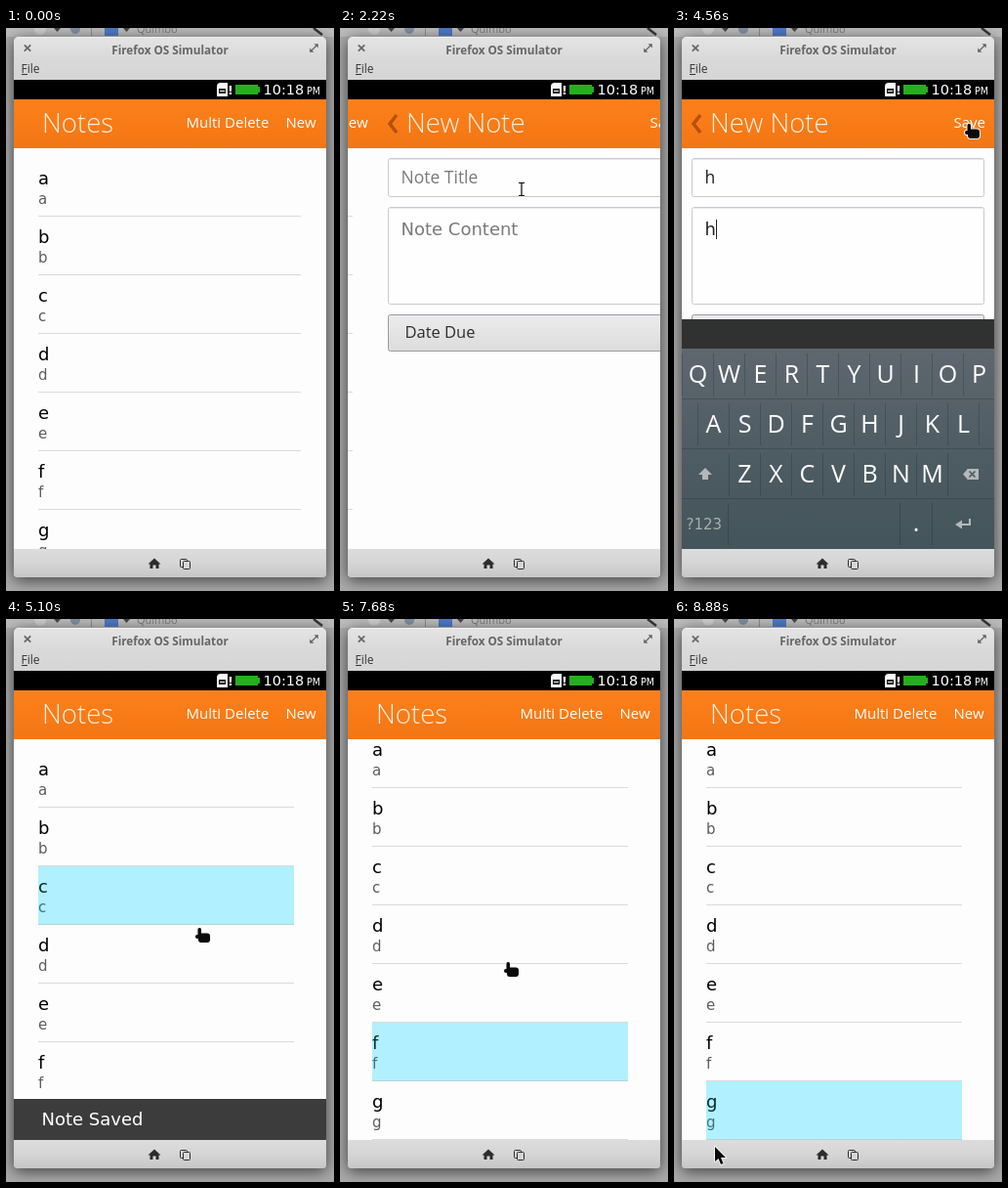
Write an HTML page with a canvas that moves like this. It is 336 by 576 pixels and loops after 8.94 s.

```html
<!DOCTYPE html>
<html lang="en">
<head>
<meta charset="utf-8">
<title>Notes</title>
<style>
html, body { margin: 0; width: 100%; height: 100%; overflow: hidden; background: #a6a6a6; }
canvas { display: block; width: 336px; height: 576px; }
</style>
</head>
<body>
<canvas id="stage" width="336" height="576"></canvas>
<script>
const c = document.getElementById('stage').getContext('2d');
const LOOP = 8940, STEP = 60, ROW = 60, KEY = 32;
const SANS = '"Open Sans", "Noto Sans", sans-serif';
const WIDE = '"DejaVu Sans", sans-serif';
const OPEN = 2004, SAVE = 4700, SLIDE = 400;

// Pointer moves: start, end, x, y reached at the end
const MOVES = [
  [60, 480, 314, 245], [780, 1560, 302, 98], [1980, 2220, 186, 165],
  [3000, 3240, 163, 224], [3900, 4560, 302, 98], [4740, 5100, 198, 316],
  [5100, 5580, 185, 374], [6600, 7020, 180, 446], [7020, 7440, 172, 351],
  [7740, 8880, 42, 540]
];

const clamp = u => Math.max(0, Math.min(1, u));
const ease = (t, start, dur) => 1 - (1 - clamp((t - start) / dur)) ** 3;

function pointer(t) {
  let x = 334, y = 490;
  for (const [start, end, tx, ty] of MOVES) {
    const u = clamp((t - start) / (end - start));
    x += (tx - x) * u;
    y += (ty - y) * u;
  }
  return { x, y };
}

function box(x, y, w, h, fill) {
  c.fillStyle = fill;
  c.fillRect(x, y, w, h);
}

function text(s, x, y, font, fill, align = 'left') {
  c.font = font;
  c.fillStyle = fill;
  c.textAlign = align;
  c.fillText(s, x, y);
}

function fade(y0, y1, ...stops) {
  const g = c.createLinearGradient(0, y0, 0, y1);
  stops.forEach((s, i) => g.addColorStop(i / (stops.length - 1), s));
  return g;
}

function line(points, stroke, width = 1) {
  c.beginPath();
  points.forEach(([x, y]) => c.lineTo(x, y));
  c.strokeStyle = stroke;
  c.lineWidth = width;
  c.stroke();
}

function cross(x, y, r, stroke) {
  line([[x - r, y - r], [x + r, y + r]], stroke, 1.7);
  line([[x + r, y - r], [x - r, y + r]], stroke, 1.7);
}

// Triangle with its base centred on x, y; turn is in quarter turns from "up"
function tri(x, y, half, height, turn, fill) {
  c.save();
  c.translate(x, y);
  c.rotate(turn * Math.PI / 2);
  c.beginPath();
  c.moveTo(-half, 0);
  c.lineTo(0, -height);
  c.lineTo(half, 0);
  c.fillStyle = fill;
  c.fill();
  c.restore();
}

function disc(x, y, r, fill) {
  c.beginPath();
  c.arc(x, y, r, 0, 7);
  c.fillStyle = fill;
  c.fill();
}

function round(x, y, w, h, r, fill, stroke) {
  c.beginPath();
  c.roundRect(x, y, w, h, r);
  if (fill) { c.fillStyle = fill; c.fill(); }
  if (stroke) { c.strokeStyle = stroke; c.lineWidth = 1; c.stroke(); }
}

function desktop() {
  box(0, 0, 336, 576, '#aaaaaa');
  box(0, 0, 336, 9, '#bcbcbc');
  disc(35, 1, 6, '#d0d0d0');
  disc(71, 1, 5, '#7f8fa0');
  for (const x of [52.5, 123.5]) tri(x, 0, 3.5, 4, 2, '#444');
  box(87, 0, 1, 8, '#8a8a8a');
  box(101, 0, 14, 8, '#4a78c8');
  text('Quimbo', 134, 5, '11px ' + SANS, '#777');
  line([[315, 0], [324, 7]], '#333', 2.5);
  c.save();
  c.shadowColor = 'rgba(40,40,40,.85)';
  c.shadowBlur = 16;
  c.shadowOffsetY = 3;
  round(8, 9, 320, 553, [5, 5, 4, 4], '#d8d8d8');
  c.restore();
}

function windowFrame() {
  const ink = '#666', dark = '#2c2c2c';
  round(8, 9, 320, 46, [5, 5, 0, 0], fade(9, 53, '#e4e4e4', '#d9d9d9', '#d5d5d5'));
  round(8, 533, 320, 29, [0, 0, 4, 4], fade(533, 562, '#dcdcdc', '#d5d5d5', '#c6c6c6'));
  box(12, 9, 312, 1, '#f0f0f0');
  text('Firefox OS Simulator', 168, 26.5, 'bold 11.7px ' + SANS, ink, 'center');
  cross(22, 20.5, 3.2, ink);
  line([[312, 24], [319, 17]], ink, 1.2);
  tri(317.7, 18.3, 3, 3, .5, ink);
  tri(313.3, 22.7, 3, 3, 2.5, ink);
  text('File', 15.5, 46, '12px ' + SANS, '#333');
  box(16, 47, 6, 1, '#333');

  tri(152, 548.5, 6.5, 6, 0, dark);
  box(147.5, 548, 9, 5, dark);
  box(150.5, 549.5, 3, 3.5, '#d5d5d5');
  round(178.5, 543.5, 7, 8, 1, null, dark);
  round(181.5, 545.5, 7, 8, 1, '#d5d5d5', dark);
}

function statusBar() {
  const white = '#f8f8f8', green = '#27ae1f';
  box(8, 53, 320, 20, '#000');
  round(216, 56, 11, 14, [4, 0, 0, 0], white);
  box(218, 62, 7, 5, '#111');
  box(219, 64, 5, 1, white);
  text('!', 227, 68, 'bold 13px ' + WIDE, white);
  box(235, 58, 23, 10, green);
  box(258, 60, 2, 6, green);
  text('10:18', 263.5, 68, '14.5px ' + WIDE, '#fff');
  text('PM', 308, 68, '9.6px ' + WIDE, '#fff');
}

const heading = s => text(s, 37, 107, '300 27.5px ' + SANS, '#fff0e2');
const button = (s, x) => text(s, x, 102, '15px ' + SANS, '#fff');

function listPage(dx, { scroll, hover, right }) {
  c.save();
  c.translate(dx, 0);
  heading('Notes');
  button('Multi Delete', 184.5);
  button('New', 286.5);
  c.beginPath();
  c.rect(8, 123, 320, 410);
  c.clip();
  [...'abcdefg'].forEach((n, i) => {
    const y = 133 + i * ROW - scroll, on = i === hover;
    if (on) box(33, y, right - 33, ROW, '#b0f0ff');
    text(n, 33, y + 27, '18px ' + WIDE, on ? '#0a2a30' : '#000');
    text(n, 33, y + 47, '15px ' + WIDE, on ? '#46727a' : '#5c5c5c');
    box(33, y + ROW - 1, right - 33, 1, on ? '#b4d4da' : '#dadada');
  });
  c.restore();
}

function field(y, h, hint, hintFont, typed, focused) {
  round(18.5, y + .5, 299, h - 1, 2, '#fefefe', '#c9c9d0');
  box(19, y + 1, 298, 1, '#e8e8ec');
  const base = y + (h > 50 ? 29 : 26);
  text(typed || hint, 31.5, base, hintFont, typed ? '#222' : '#7a7a7a');
  if (focused) box(typed ? 43 : 32, base - 16, 1, 20, '#222');
}

function formPage(dx, t) {
  c.save();
  c.translate(dx, 0);
  line([[27, 89], [20, 98], [27, 107]], '#b8500c', 3.6);
  heading('New Note');
  button('Save', 286.5);
  field(133, 40, 'Note Title', '17.5px ' + SANS, t >= 3060 && 'h', t >= 2580 && t < 3420);
  field(183, 100, 'Note Content', '18px ' + WIDE, t >= 3660 && 'h', t >= 3420 && t < SAVE);
  round(18.5, 293.5, 299, 37, 2, fade(293, 331, '#ececec', '#dcdcdc'), '#9a9aa2');
  text('Date Due', 35.5, 317, '16.5px ' + SANS, '#2c2c2c');
  c.restore();
}

function keyboard(up) {
  if (up <= 0) return;
  const grey = '#b4b8b8', edge = 'rgba(25,32,38,.25)';
  const divider = (x, y) => box(x, y + 4, 1, 43, edge);
  c.save();
  c.translate(0, Math.round(235 * (1 - up)));
  box(8, 298, 320, 31, '#303131');
  box(8, 328, 320, 205, fade(328, 533, '#5f676f', '#546067', '#4a5a60', '#43545a'));
  ['QWERTYUIOP', 'ASDFGHJKL', 'ZXCVBNM'].forEach((keys, r) => {
    const y = 329 + 51 * r, left = 168 - keys.length * KEY / 2;
    [...keys].forEach((k, i) => {
      divider(left + KEY * i, y);
      text(k, left + KEY * (i + .5) + .5, y + 34, '25px ' + SANS, '#fff', 'center');
    });
    divider(left + KEY * keys.length, y);
    box(8, y + 50, 320, 1, edge);
  });
  [55, 231, 264].forEach(x => divider(x, 482));
  text('?123', 12.5, 513, '15px ' + WIDE, '#a8adad');
  text('.', 248, 515, '25px ' + SANS, '#fff', 'center');

  tri(32, 457, 7, 7, 0, grey);
  box(29, 456, 6, 6, grey);
  tri(301, 456.5, 5.5, 5, 3, grey);
  box(300.5, 451, 11.5, 11, grey);
  cross(305.5, 456.5, 3, '#4e5c62');
  line([[303, 502], [303, 508], [294, 508]], grey, 2);
  tri(295, 508, 4.5, 7, 3, grey);
  c.restore();
}

function toast(drop) {
  box(8, 491 + drop, 320, 42, '#3c3c3c');
  text('Note Saved', 36.5, 518 + drop, '18px ' + WIDE, '#fff');
}

const hand = new Path2D();
hand.roundRect(-1.5, 0, 3.5, 11, 1.5);
hand.roundRect(-1, 5.5, 12, 9.5, 3);
hand.roundRect(-4, 7, 6, 4, 2);
const arrow = new Path2D('M0 0V15L3.5 12L6 18L8.5 17L6 11H11Z');
const beam = new Path2D('M-3 -6.5H3M0 -6.5V6.5M-3 6.5H3');

function cursor({ x, y }, form) {
  const header = y > 73 && y < 123;
  const typing = form && x > 18 && x < 318 && y > 132 && y < 283;
  const pointing = y < 533 && (header ? x > 180 : !form && x < 303);
  c.save();
  c.translate(Math.round(x), Math.round(y));
  c.lineJoin = 'round';
  const shape = typing ? beam : pointing ? hand : arrow;
  c.strokeStyle = '#f4f4f4';
  c.lineWidth = typing ? 3 : 2;
  c.stroke(shape);
  c.strokeStyle = c.fillStyle = '#0a0a0a';
  c.lineWidth = 1.2;
  if (typing) c.stroke(shape);
  else c.fill(shape);
  c.restore();
}

// The highlight trails the pointer by one step; a held row stays lit
function hovered(t, scroll, slide) {
  if (t >= 7080 && t < 7860) return 5;
  const { x, y } = pointer(t - STEP);
  if (slide > .1 || x < 33 || x > 302 || y < 123 || y >= 533) return -1;
  return Math.floor((y - 133 + scroll) / ROW);
}

function draw(t) {
  const saved = t >= SAVE;
  const slide = saved ? 1 - ease(t, SAVE, SLIDE) : ease(t, OPEN, SLIDE);
  const scroll = Math.round(20 * clamp((t - 7140) / 240));

  desktop();
  windowFrame();
  c.save();
  c.beginPath();
  c.rect(8, 53, 320, 480);
  c.clip();
  box(8, 73, 320, 460, '#fdfdfd');
  box(8, 73, 320, 50, fade(73, 123, '#fb801c', '#f87b17', '#f37616'));
  if (slide < 1) {
    listPage(Math.round(-320 * slide), { scroll, hover: hovered(t, scroll, slide), right: saved ? 295 : 302 });
  }
  if (slide > 0) formPage(Math.round(320 * (1 - slide)), t);
  keyboard(saved ? 1 - ease(t, SAVE, 220) : ease(t, 2540, 280));
  if (t >= 4800 && t < 6660) toast(t < 6600 ? Math.round(42 * (1 - ease(t, 4800, 240))) : 36);
  statusBar();
  c.restore();
  if (t >= MOVES[0][0]) cursor(pointer(t), slide > .5);
}

const start = performance.now();
function tick() {
  const t = (performance.now() - start) % LOOP;
  draw(Math.floor(t / STEP) * STEP);
  requestAnimationFrame(tick);
}
tick();
</script>
</body>
</html>
```
